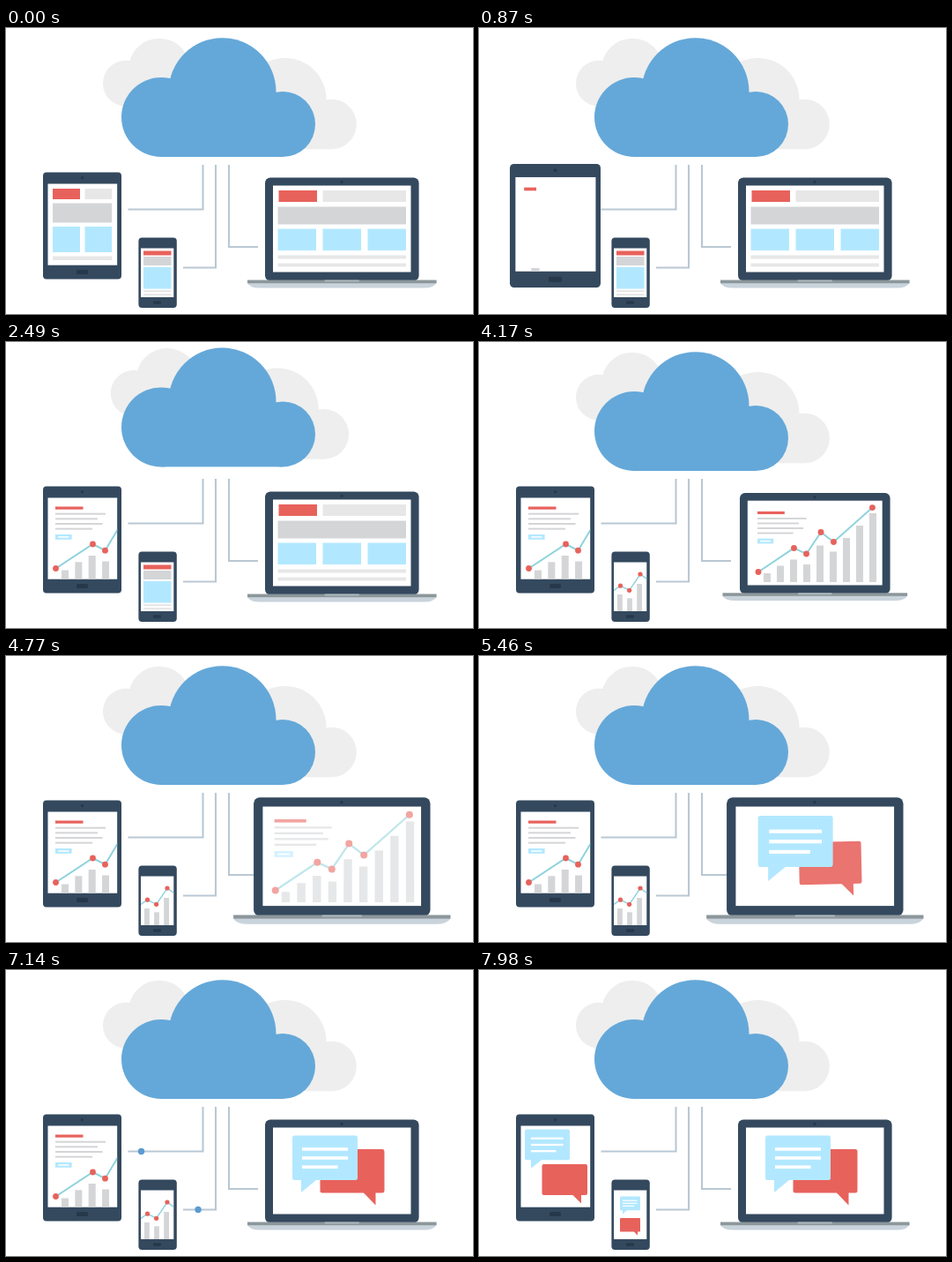
An HTML page that plays this animation: 530x324 px, repeating every 8000 ms.

```html
<!DOCTYPE html>
<html lang="en">
<head>
<meta charset="utf-8">
<title>Cloud sync</title>
<style>
html, body { margin: 0; width: 100%; height: 100%; overflow: hidden; background: #fff; }
svg { display: block; width: 100%; height: 100%; }
</style>
</head>
<body>
<svg id="stage" viewBox="0 0 530 324">
  <defs>
    <clipPath id="tabletClip"><rect x="47.5" y="176.5" width="78.7" height="92.2"/></clipPath>
    <clipPath id="phoneClip"><rect x="153" y="249.5" width="37.3" height="55.5"/></clipPath>
    <clipPath id="laptopClip"><rect x="303" y="178.5" width="156.5" height="98"/></clipPath>
  </defs>
  <g id="scene"></g>
</svg>
<script>
const LOOP = 8000;
const RED = '#e8625c', SKY = '#b2e8ff', GREY = '#d4d5d7', PALE = '#e7e7e8',
      NAVY = '#34495e', DARK = '#26384a', BLUE = '#64a8d9', LINE = '#b9c8d3', TEAL = '#8fd3dc';
const scene = document.getElementById('scene');

const clamp = v => Math.min(1, Math.max(0, v));
const span = (t, start, length) => clamp((t - start) / length);
const inOut = p => p < .5 ? 4 * p ** 3 : 1 - 4 * (1 - p) ** 3;
const smooth = p => p * p * (3 - 2 * p);
const out = p => 1 - (1 - p) ** 3;
const backOut = p => 1 + 2.7 * (p - 1) ** 3 + 1.7 * (p - 1) ** 2;

// Eased value from [time, value] pairs
function keys(t, list) {
  if (t <= list[0][0]) return list[0][1];
  for (let i = 1; i < list.length; i++) {
    const [t0, a] = list[i - 1], [t1, b] = list[i];
    if (t < t1) return a + (b - a) * smooth((t - t0) / (t1 - t0));
  }
  return list[list.length - 1][1];
}

const rect = (x, y, w, h, fill, rx = 0) =>
  `<rect x="${x}" y="${y}" width="${w}" height="${h}" rx="${rx}" fill="${fill}"/>`;
const circle = (x, y, r, fill, opacity = 1) =>
  `<circle cx="${x}" cy="${y}" r="${r}" fill="${fill}" opacity="${opacity}"/>`;
const group = (body, transform, opacity = 1) =>
  `<g transform="${transform || 'translate(0)'}" opacity="${opacity}">${body}</g>`;
const scaleAt = (x, y, s) => `translate(${x} ${y}) scale(${s}) translate(${-x} ${-y})`;

// Where each device changes: [chart start, bubbles start]
const devices = {
  tablet: {
    times: [700, 7200], pops: [7330, 7440], center: [86.5, 224], wobble: 0,
    scale: [[360, 1], [480, .98], [780, 1.157], [1140, 1.157], [1230, 1.207], [1590, 1.022], [1650, 1]],
    body: rect(42, 163.5, 89, 121, NAVY, 4) + circle(86.5, 169.7, 1.6, DARK) +
      rect(80, 274, 13, 5, DARK, 1.5) + rect(47.5, 176.5, 78.7, 92.2, '#fff'),
    blocks: rect(53, 182, 31, 12, RED) + rect(89.5, 182, 30.7, 12, PALE) +
      rect(53, 198.5, 67.2, 22, GREY) + rect(53, 225, 31, 29, SKY) +
      rect(89.5, 225, 30.7, 29, SKY) + rect(53, 258.5, 67.2, 4.5, PALE),
    text: { x: 56, y: 186.5, widths: [57, 48, 53.5, 42] },
    bars: { x: 63, step: 15.35, width: 8, base: 268.7, tops: [258.5, 249.3, 242, 248.5] },
    points: [[56.5, 256.5], [98.5, 229], [112.5, 236.2], [127, 212]], dots: [0, 1, 2], r: 3.4, stroke: 2,
    bubbles: {
      blue: [52, 180.5, 51, 34.7], red: [71.5, 220, 51.5, 35], tail: [7, 12, 9.6],
      lines: [[190.8, 36.5], [198, 36.5], [205.2, 28.5]], inset: 7, weight: 2.3
    }
  },
  phone: {
    times: [2800, 7200], pops: [7360, 7470], center: [172, 277], wobble: 0, scale: [[0, 1]],
    body: rect(150.4, 237.5, 43.4, 79.5, NAVY, 4) + rect(167, 309.3, 9, 3.4, DARK, 1.2) +
      rect(153, 249.5, 37.3, 55.5, '#fff'),
    blocks: rect(156, 252.5, 31.5, 5, RED) + rect(156, 259, 31.5, 10, GREY) +
      rect(156, 271, 31.5, 24.5, SKY) + rect(156, 297, 31.5, 2, PALE) + rect(156, 301, 31.5, 2, PALE),
    bars: { x: 157, step: 11.1, width: 5.8, base: 305, tops: [286, 290.3, 274] },
    points: [[152, 282], [160.5, 276.2], [170.6, 281.3], [183, 263], [191, 269]], dots: [1, 2, 3], r: 2.6, stroke: 1.5,
    bubbles: {
      blue: [160, 256.5, 23, 15.8], red: [160, 281, 23, 15.5], tail: [3, 5, 4.3],
      lines: [[261.2, 16.5], [264.3, 16.5], [267.4, 13]], inset: 3, weight: 1.2
    }
  },
  laptop: {
    times: [2800, 4680], pops: [5000, 5350], center: [381.3, 232], wobble: 10,
    scale: [[3480, 1], [3570, .98], [4140, .98], [4170, .977], [4200, .977], [4510, 1.171],
      [4660, 1.148], [5750, 1.148], [6000, 1]],
    body: rect(294, 169.5, 174.6, 117, NAVY, 6) + circle(381, 174.3, 1.6, DARK) +
      rect(303, 178.5, 156.5, 98, '#fff') +
      `<path d="M274 289H488.6Q485 294.5 474 294.5H288.6Q277 294.5 274 289Z" fill="#c9d3db"/>` +
      rect(274, 285.5, 214.6, 3.7, '#8c979c') + rect(361.5, 285.5, 39.5, 1.9, '#abb6bd', .8),
    blocks: rect(309.5, 184, 43.5, 13, RED) + rect(359.5, 184, 94.5, 13, PALE) +
      rect(308.5, 202.5, 145.5, 20, GREY) +
      [0, 1, 2].map(i => rect(308.5 + 51 * i, 227.5, 43.5, 24.5, SKY)).join('') +
      rect(308.5, 257.5, 145.5, 4, PALE) + rect(308.5, 266.5, 145.5, 4, PALE),
    text: { x: 314.5, y: 191, widths: [56.8, 48.2, 53.2, 41.5] },
    bars: {
      x: 321.6, step: 15.36, width: 8.2, base: 273,
      tops: [262.7, 254, 246.8, 252.5, 230.5, 237.6, 221.8, 207.4, 193.1]
    },
    points: [[315.5, 261.2], [356.9, 233.5], [371.3, 240.2], [388.2, 215.1], [403, 226.4], [448, 186.5]],
    dots: [0, 1, 2, 3, 4, 5], r: 3.5, stroke: 2,
    bubbles: {
      blue: [325, 187.5, 74, 50.5], red: [356.5, 203, 73, 49.5], tail: [10, 17, 14],
      lines: [[203, 52], [213, 52], [223.2, 40.5]], inset: 11, weight: 3.6
    }
  }
};

function chart(d, g) {
  let svg = '';
  if (d.text) {
    const { x, y, widths } = d.text, grow = i => out(span(g, i * .08, .45));
    svg += rect(x, y, 31.5 * grow(0), 3.2, RED);
    widths.forEach((w, i) => svg += rect(x, y + 7.2 + 5.65 * i, w * grow(i + 1), 2, GREY));
    svg += group(rect(x, y + 31.5, 18.6, 5.8, SKY) + rect(x + 3.2, y + 33.7, 12.2, 1.5, '#fff'), '', grow(5));
  }
  const { x, step, width, base, tops } = d.bars;
  tops.forEach((top, i) => {
    const h = (base - top) * out(span(g, .3 * i / tops.length, .55));
    svg += rect(x + step * i, base - h, width, h, GREY);
  });
  const p = span(g, .25, .7), last = d.points.length - 1;
  svg += `<polyline points="${d.points.join(' ')}" pathLength="100" fill="none" stroke="${TEAL}"
    stroke-width="${d.stroke}" stroke-dasharray="${p >= 1 ? 'none' : 100 * p + ' 200'}" opacity="${p ? 1 : 0}"/>`;
  for (const i of d.dots) svg += circle(...d.points[i], d.r * out(span(p, .85 * i / last, .15)), RED);
  return svg;
}

function bubbles(d, t) {
  const { blue, red, tail: [near, far, drop], lines, inset, weight } = d.bubbles;
  const shape = ([x, y, w, h], fill, a, b) =>
    rect(x, y, w, h, fill, Math.min(2.5, w / 25)) +
    `<path d="M${a} ${y + h - 1}V${y + h + drop}L${b} ${y + h}V${y + h - 1}Z" fill="${fill}"/>`;
  const pop = (i, x, y, body) => {
    const u = t - d.pops[i], p = span(u, 0, 420);
    const turn = i ? d.wobble * Math.exp(-u / 350) * Math.cos(u * Math.PI / 200) : 0;
    return p ? group(body, `rotate(${turn} ${x} ${y}) ` + scaleAt(x, y, backOut(p)), span(p, 0, .3)) : '';
  };
  const rx = red[0] + red[2] - (far - near) * 1.5, edge = red[0] + red[2] - near;
  const text = lines.map(([y, w]) => rect(blue[0] + inset, y - weight / 2, w, weight, '#fff')).join('');
  return pop(1, edge, red[1] + red[3] + drop, shape(red, RED, edge, Math.min(rx, edge - far + near)
      - Math.max(0, far - near - (edge - rx)))) +
    pop(0, blue[0] + near, blue[1] + blue[3] + drop, shape(blue, SKY, blue[0] + near, blue[0] + near + far) + text);
}

function device(name, t) {
  const d = devices[name], [first, second] = d.times;
  let content;
  if (t < first + 150) content = group(d.blocks, '', 1 - span(t, first, 150));
  else if (t < second + 210) content = group(chart(d, span(t, first + 130, 620)), '', 1 - span(t, second, 210));
  else content = '';
  if (t > second) content += bubbles(d, t);
  return group(d.body + `<g clip-path="url(#${name}Clip)">${content}</g>`,
    scaleAt(...d.center, keys(t, d.scale)));
}

// Each wire runs from the cloud: down to y, then across to x
const wires = {
  tablet: [223.5, 205.5, 138.5],
  phone: [238, 271.5, 201],
  laptop: [253, 248, 286]
};
const wire = ([x, y, end]) =>
  `<path d="M${x} 155V${y}H${end}" fill="none" stroke="${LINE}" stroke-width="2.1"/>`;

function packet(name, t, start, length, up) {
  const p = span(t, start, length);
  if (!p || p === 1) return '';
  const [x, y, end] = wires[name], drop = y - 155, total = drop + Math.abs(end - x);
  const s = total * (up ? 1 - inOut(p) : inOut(p));
  const px = x + Math.sign(end - x) * Math.max(0, s - drop);
  return circle(px, 155 + Math.min(s, drop), 3.7, '#5b9bd1', Math.min(1, p * 9, (1 - p) * 9));
}

function cloud(t) {
  const lift = keys(t < 5000 ? t - 1980 : t - 6380, [[0, 0], [110, 10], [200, 4.6], [510, 4.6], [650, 0]]);
  const near = lift * 1.9, pale = '#eeeeee';
  const left = circle(174, 46.7, 35, pale) + circle(136, 62.7, 26, pale) + rect(136, 55, 50, 33.7, pale);
  const right = circle(316.5, 81, 47, pale) + circle(369.5, 109, 28.3, pale) + rect(316, 90, 53.5, 47.3, pale);
  const front = circle(176, 101, 45, BLUE) + circle(245.5, 72.2, 61, BLUE) +
    circle(314, 109, 37, BLUE) + rect(176, 80, 138, 66, BLUE);
  return group(group(left, `translate(${near} 0)`) + group(right, `translate(${-near} 0)`) + front,
    `translate(0 ${-lift})`);
}

function render(t) {
  scene.innerHTML =
    Object.values(wires).map(wire).join('') +
    packet('tablet', t, 1560, 420, true) +
    packet('phone', t, 2490, 360) + packet('laptop', t, 2490, 360) +
    packet('laptop', t, 5976, 420, true) +
    packet('tablet', t, 6890, 360) + packet('phone', t, 6890, 360) +
    cloud(t) +
    Object.keys(devices).map(name => device(name, t)).join('');
}

const begin = performance.now();
function tick() {
  render((performance.now() - begin) % LOOP);
  requestAnimationFrame(tick);
}
tick();
</script>
</body>
</html>
```
